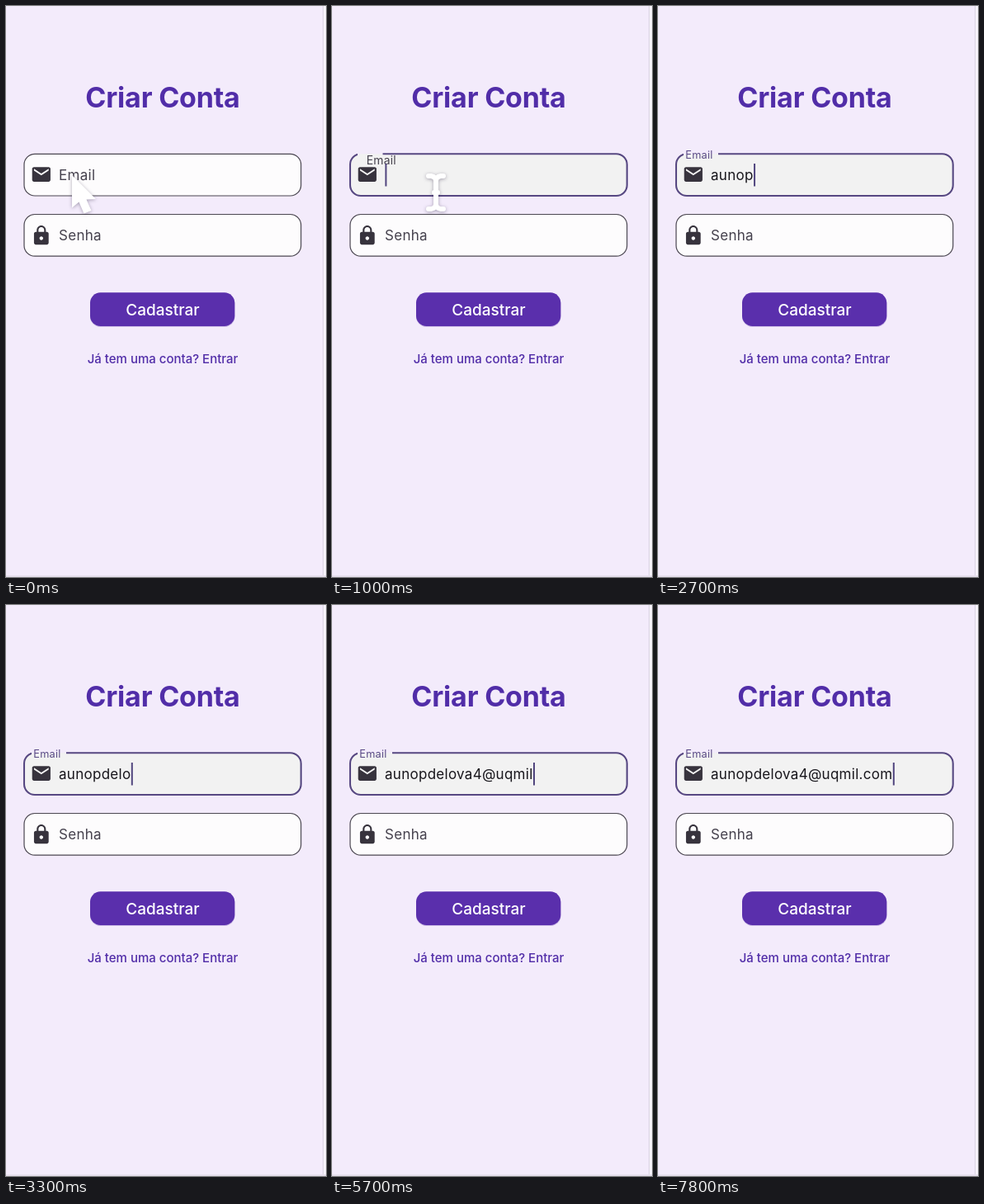
Write an HTML page that moves like this. It is 388 by 692 pixels and loops after 8000 ms.

```html
<!DOCTYPE html>
<html lang="pt">
<head>
<meta charset="utf-8">
<title>Criar Conta</title>
<style>
  html, body { margin: 0; height: 100%; overflow: hidden; background: #f3ebfb; }
  svg { display: block; width: 100vw; height: 100vh; }
  text { font-family: Inter, "Open Sans", sans-serif; white-space: pre; }
  .accent { fill: #512da8; text-anchor: middle; }
  .title { font-size: 34px; font-weight: 700; letter-spacing: -.2px; }
  .link { font-size: 15px; font-weight: 500; }
  .action { font-size: 19px; font-weight: 500; fill: #fff; text-anchor: middle; }
  .input { font-size: 17px; letter-spacing: .28px; }
  .label { fill: #45414d; }
  .icon { fill: #37333d; }
  .box { fill: #fdfcfd; }
  .edge { fill: none; stroke: #4b4751; stroke-width: 1.2; }
  .focus .box { fill: #f2f2f2; }
  .focus .edge { stroke: #574882; stroke-width: 2.1; }
  .lit .label { fill: #5a4a86; }
  .pointer { filter: drop-shadow(0 1.5px 2px rgba(50, 40, 70, .4)); }
</style>
</head>
<body>
<svg viewBox="0 0 388 692" preserveAspectRatio="none">
  <defs>
    <clipPath id="notch"><path id="gap" clip-rule="evenodd"/></clipPath>
  </defs>
  <rect width="388" height="692" fill="#f3ebfb"/>
  <rect x="385" width="3" height="692" fill="#f7f3fb"/>
  <rect x="384" width="1" height="692" fill="#d9d3e2"/>
  <rect y="690" width="388" height="2" fill="#e7e0ee"/>

  <text class="accent title" x="190" y="123.2">Criar Conta</text>

  <g id="email">
    <rect class="box" x="22" y="179.3" width="335.7" height="50.7" rx="13"/>
    <g clip-path="url(#notch)">
      <rect class="edge" x="22" y="179.3" width="335.7" height="50.7" rx="13"/>
    </g>
    <path class="icon" transform="translate(29.5 190.7) scale(1.11)" d="M20 4H4c-1.1 0-2 .9-2 2v12c0 1.1.9 2 2 2h16c1.1 0 2-.9 2-2V6c0-1.1-.9-2-2-2zm0 4l-8 5-8-5V6l8 5 8-5v2z"/>
    <text id="label" class="input label">Email</text>
    <text id="typed" class="input" x="64" y="211" fill="#18161c"></text>
    <rect id="caret" y="191" width="2" height="27.5" fill="#51467f"/>
  </g>

  <rect class="box" x="22" y="252.5" width="335.7" height="50.7" rx="13"/>
  <rect class="edge" x="22" y="252.5" width="335.7" height="50.7" rx="13"/>
  <path class="icon" transform="translate(29.5 264.9) scale(1.11)" d="M18 8h-1V6c0-2.76-2.24-5-5-5S7 3.24 7 6v2H6c-1.1 0-2 .9-2 2v10c0 1.1.9 2 2 2h12c1.1 0 2-.9 2-2V10c0-1.1-.9-2-2-2zm-6 9c-1.1 0-2-.9-2-2s.9-2 2-2 2 .9 2 2-.9 2-2 2zm3.1-9H8.9V6c0-1.71 1.39-3.1 3.1-3.1s3.1 1.39 3.1 3.1v2z"/>
  <text class="input label" x="64" y="284.3">Senha</text>

  <rect x="102" y="348.5" width="175.5" height="40.5" rx="12.5" fill="#c9b8e4"/>
  <rect x="102" y="347.3" width="175.3" height="40.7" rx="12.5" fill="#5a2fac"/>
  <text class="action" x="190" y="374.6">Cadastrar</text>
  <text class="accent link" x="190" y="432.5">Já tem uma conta? Entrar</text>

  <path id="arrow" class="pointer" fill="#fff" d="M0 0V39.5L8.5 32.5L14.5 46.5L23.5 43L17.5 29.5L29 29Z"/>
  <path id="beam" class="pointer" fill="none" stroke="#fff" stroke-width="6" stroke-linecap="round" stroke-linejoin="round"
    transform="translate(126 226)" d="M-9-20H-6Q0-19 0-14Q0-19 6-20H9M0-14V14M-9 20H-6Q0 19 0 14Q0 19 6 20H9M-2 0H2"/>
</svg>
<script>
  const $ = id => document.getElementById(id);
  const LOOP = 8000, STEP = 100, FOCUS = 900;
  const address = "aunopdelova4@uqmil.com";
  const keys = [1900, 2300, 2500, 2600, 2700, 2900, 3000, 3100, 3300, 3500, 3700, 4100,
                5000, 5100, 5200, 5300, 5500, 5700, 7400, 7500, 7700, 7800];

  const clamp = v => Math.min(1, Math.max(0, v));
  const smooth = v => v * v * (3 - 2 * v);
  const mix = (a, b, p) => a + (b - a) * p;
  const show = (el, on) => el.setAttribute("visibility", on ? "visible" : "hidden");

  function drawLabel(t) {
    const p = smooth(clamp((t - FOCUS + 5) / 160));
    const x = mix(64, 33.3, p), y = mix(211, 184.7, p);
    $("label").setAttribute("transform", `translate(${x} ${y}) scale(${mix(1, .75, p)})`);
    $("gap").setAttribute("d", `M0 0H388V692H0ZM31 170h${42 * p}v18H31Z`);
    $("email").setAttribute("class", t < FOCUS ? "" : t < 1100 ? "focus" : "focus lit");
  }

  function drawInput(t) {
    const count = keys.filter(k => k <= t).length;
    const last = count ? keys[count - 1] : FOCUS;
    $("typed").textContent = address.slice(0, count);
    const width = count ? $("typed").getComputedTextLength() : 0;
    $("caret").setAttribute("x", 64.4 + width);
    show($("caret"), t >= FOCUS && Math.floor((t - last) / 500) % 2 === 0);
  }

  function drawPointer(t) {
    const p = smooth(clamp(t / 700));
    $("arrow").setAttribute("transform", `translate(${mix(80, 126, p)} ${mix(205, 226, p)})`);
    show($("arrow"), t < FOCUS);
    show($("beam"), t >= FOCUS && t < keys[0]);
  }

  const start = performance.now();
  function draw() {
    const now = Math.max(0, performance.now() - start) % LOOP;
    const t = Math.floor(now / STEP) * STEP;
    drawLabel(t);
    drawInput(t);
    drawPointer(t);
    requestAnimationFrame(draw);
  }
  draw();
</script>
</body>
</html>
```
